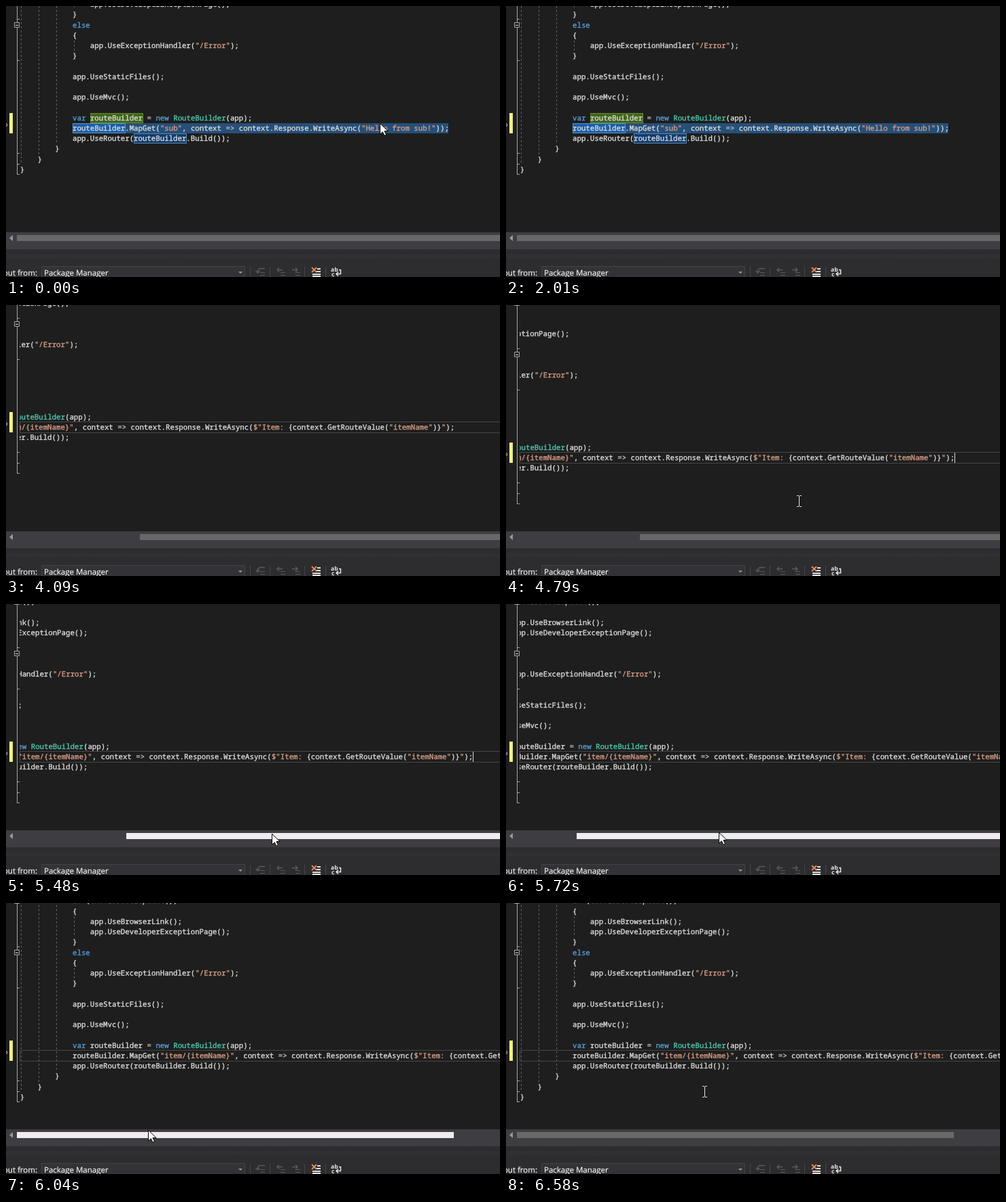
Recreate the animation shown at these times as an HTML page with a canvas. Size 727 px wide and 400 px high, loop 7.42 s.

```html
<!DOCTYPE html>
<html lang="en">
<head>
<meta charset="utf-8">
<title>Code editor</title>
<style>
html, body { margin: 0; width: 100%; height: 100%; overflow: hidden; background: #1e1e1e; }
canvas { display: block; }
</style>
</head>
<body>
<canvas id="stage" width="727" height="400"></canvas>
<script>
const W = 727, H = 400, LOOP = 7420;
const ctx = document.getElementById('stage').getContext('2d');

const CELL = 6.44, ROW = 15.24, SCROLL_ROW = 15, LEFT = 20.8, TOP = 20.4;
const EDITOR_BOTTOM = 334, CARET_ROW = 10;
const CODE_FONT = '10.733px "Noto Sans Mono", "DejaVu Sans Mono", monospace';
const UI_FONT = '11.5px "Open Sans", "Noto Sans", sans-serif';
const COLOR = { k: '#569cd6', s: '#d69d85', t: '#4ec9b0', o: '#b4b4b4', p: '#dcdcdc' };

// Markup: <k:word> colours a token, everything else is plain text.
const CODE = [
  [-5, 8, '<k:if> (env.IsDevelopment())'],
  [-4, 8, '{'],
  [-3, 12, 'app.UseBrowserLink();'],
  [-2, 12, 'app.UseDeveloperExceptionPage();'],
  [-1, 8, '}'],
  [0, 8, '<k:else>'],
  [1, 8, '{'],
  [2, 12, 'app.UseExceptionHandler(<s:"/Error">);'],
  [3, 8, '}'],
  [5, 8, 'app.UseStaticFiles();'],
  [7, 8, 'app.UseMvc();'],
  [9, 8, '<k:var> routeBuilder <o:=> <k:new> <t:RouteBuilder>(app);'],
  [11, 8, 'app.UseRouter(routeBuilder.Build());'],
  [12, 4, '}'],
  [13, 0, '}'],
  [14, -4, '}']
];
const OLD_LINE = 'routeBuilder.MapGet(<s:"sub">, context <o:=\u003e> context.Response.WriteAsync(<s:"Hello from sub!">));';
const NEW_LINE = 'routeBuilder.MapGet(<s:"item/{itemName}">, context <o:=\u003e> context.Response.WriteAsync(' +
  '<s:$"Item: >{context.GetRouteValue(<s:"itemName">)}<s:">);';

// Indent guides: column, first row, last row.
const GUIDES = [[0, -8, 13], [4, -8, 12], [8, -8, 11], [12, -3, -2], [12, 2, 2]];

// Hard changes: [time, value...]
const SCROLL = [[0, 0], [4250, 1], [4400, 2], [4630, 3]];
const CARET = [[0, 0], [370, 1], [910, 0], [1460, 1], [2010, 0], [2160, 1], [2470, 0], [2550, 1],
  [3010, 0], [3560, 1], [4090, 0], [4630, 1]];
const THUMB = [[0, '#686868'], [5020, '#9e9e9e'], [5330, '#efebef'], [6350, '#9e9e9e'], [6430, '#686868']];
const POINTER = [
  [0, 'arrow', 550, 173], [520, 'beam', 553, 170], [600, ''],
  [4170, 'beam', 470, 250], [4250, 'beam', 440, 280], [4320, 'beam', 431, 289],
  [4860, 'beam', 428, 308], [4940, 'arrow', 421, 334], [5020, 'arrow', 414, 342], [5100, 'arrow', 412, 340],
  [6350, 'arrow', 222, 334], [6430, 'beam', 255, 302], [6510, 'beam', 282, 284], [6580, 'beam', 292, 278]
];
const PASTE = 2160, DRAG = 5480, DRAG_STEP = 78, DRAG_LAST = 7;

const at = (list, t) => list.filter(e => e[0] <= t).pop();
const dragStep = t => Math.min(DRAG_LAST, Math.floor((t - DRAG) / DRAG_STEP));

function rect(x, y, w, h, color) {
  ctx.fillStyle = color;
  ctx.fillRect(x, y, w, h);
}

function frame(x, y, w, h, color) {
  ctx.strokeStyle = color;
  ctx.lineWidth = 1;
  ctx.strokeRect(x + 0.5, y + 0.5, w - 1, h - 1);
}

function path(points, color, width = 1) {
  ctx.beginPath();
  points.forEach(([x, y]) => ctx.lineTo(x, y));
  ctx.strokeStyle = color;
  ctx.lineWidth = width;
  ctx.stroke();
}

function fillShape(points, color) {
  ctx.beginPath();
  points.forEach(([x, y]) => ctx.lineTo(x, y));
  ctx.closePath();
  ctx.fillStyle = color;
  ctx.fill();
}

// A hairline outline gives the text its sturdy screen weight.
function write(text, x, y, color, weight) {
  ctx.fillStyle = ctx.strokeStyle = color;
  ctx.lineWidth = weight;
  ctx.fillText(text, x, y);
  ctx.strokeText(text, x, y);
}

function label(text, x, y, align = 'left') {
  ctx.font = UI_FONT;
  ctx.textAlign = align;
  write(text, x, y, '#f1f1f1', 0.2);
  ctx.textAlign = 'left';
}

function codeLine(markup, x, y) {
  ctx.font = CODE_FONT;
  const tokens = markup.matchAll(/<([kst]):([^>]*)>|<o:(=>?)>|([^<]+)/g);
  for (const [, kind, word, op, plain] of tokens) {
    const text = word || op || plain;
    write(text, x, y, COLOR[kind || (op ? 'o' : 'p')], 0.35);
    x += text.length * CELL;
  }
}

function view(t) {
  let shift = 0;
  if (t >= DRAG) shift = Math.max(0, 209.5 - 31.8 * dragStep(t));
  else if (t >= PASTE) shift = 236.5;
  const top = TOP + at(SCROLL, t)[1] * SCROLL_ROW;
  return { shift, x: col => LEFT - shift + col * CELL, y: row => top + row * ROW };
}

function highlight(v, col, row, fill, edge) {
  const x = Math.round(v.x(col)), y = Math.round(v.y(row));
  rect(x, y, 78, 15, fill);
  frame(x, y, 78, 15, edge);
}

function margin(v, t) {
  const gray = '#a5a5a5', end = Math.round(v.y(14) + 15);
  rect(5, Math.round(v.y(9)), 5, 30, '#eff284');
  rect(16, 0, 1, end, gray);
  for (const row of [-1, 3, 12, 13, 14]) rect(16, Math.round(v.y(row) + 14), 4, 1, gray);
  for (const row of [-5, 0]) {
    const y = Math.round(v.y(row) + 3.5);
    rect(12, y, 8, 8, '#1e1e1e');
    frame(12, y, 8, 8, gray);
    rect(14, y + 4, 4, 1, '#dcdcdc');
  }
  if (t < PASTE || t >= 2780) {
    ctx.beginPath();
    ctx.arc(-0.5, v.y(CARET_ROW) + 2.8, 2.2, -1.5, 1.5);
    ctx.strokeStyle = '#c8c8c8';
    ctx.lineWidth = 1;
    ctx.stroke();
  }
}

function editor(v, t) {
  const pasted = t >= PASTE, caretY = Math.round(v.y(CARET_ROW));
  ctx.save();
  ctx.beginPath();
  ctx.rect(0, 0, W, EDITOR_BOTTOM);
  ctx.clip();
  margin(v, t);
  ctx.beginPath();
  ctx.rect(20, 0, W, EDITOR_BOTTOM);
  ctx.clip();

  ctx.setLineDash([3, 3]);
  for (const [col, from, to] of GUIDES) {
    const x = Math.round(v.x(col) + 1.5) + 0.5;
    path([[x, Math.round(v.y(from))], [x, Math.round(v.y(to + 1))]], '#626262');
  }
  ctx.setLineDash([]);

  if (!pasted) {
    rect(98, caretY, 553, 15, '#264f78');
    highlight(v, 16, 9, '#41651a', '#628a30');
    highlight(v, 12, CARET_ROW, '#1a5fa8', '#5c93c8');
    highlight(v, 26, 11, '#113d6f', '#5c86ad');
  } else if (t >= 2240) {
    frame(20, caretY - 1, W, 17, '#464646');
  }

  for (const [row, indent, text] of CODE) {
    codeLine(text, v.x(indent + 4), Math.round(v.y(row) + 11.2));
  }
  codeLine(pasted ? NEW_LINE : OLD_LINE, v.x(12), Math.round(v.y(CARET_ROW) + 11.2));

  if (at(CARET, t)[1]) {
    const x = pasted ? Math.round(v.x(136)) : 98;
    rect(x, caretY, 1, 15, '#dcdcdc');
  }
  ctx.restore();
}

function scrollbar(v, t) {
  rect(0, EDITOR_BOTTOM, W, 25, '#3e3e42');
  fillShape([[5, 342.5], [10, 338], [10, 347]], '#999999');
  const settled = t >= 2240;
  const x = settled ? Math.round(16 + v.shift * 0.767) : 16;
  rect(x, 338, settled ? 643 : W, 9, at(THUMB, t)[1]);
}

function indentIcon(x, dir) {
  const dim = '#5a5a5e', mid = x + 4;
  path([[mid - 4 * dir, 389.5], [mid + 4 * dir, 389.5]], dim, 1.5);
  path([[mid - dir, 386.5], [mid - 4 * dir, 389.5], [mid - dir, 392.5]], dim, 1.5);
  for (const y of [393, 397]) rect(x + 5, y, 7, 1, dim);
}

function toolbar() {
  rect(0, 359, W, 41, '#2d2d30');
  for (let x = 0; x < W; x += 4) {
    rect(x, 367, 1, 1, '#46464a');
    rect(x + 2, 369, 1, 1, '#46464a');
    rect(x, 371, 1, 1, '#46464a');
  }

  label('Show output from:', 46, 398, 'right');
  rect(52, 384, 300, 20, '#333337');
  frame(52, 384, 300, 20, '#434346');
  label('Package Manager', 56, 398);
  fillShape([[342, 392], [348, 392], [345, 395]], '#999999');

  for (const x of [359, 388, 439, 470]) rect(x, 385, 1, 15, '#46464a');

  const dim = '#5a5a5e';
  path([[381, 387.5], [373, 387.5], [370.5, 390], [370.5, 393]], dim, 1.5);
  path([[367.5, 391], [370.5, 394], [373.5, 391]], dim, 1.5);
  for (const y of [393, 397]) rect(374, y, 7, 1, dim);
  indentIcon(399, 1);
  indentIcon(421, -1);

  for (const [y, x] of [[387, 458], [391, 457], [395, 451], [398, 451]]) rect(x, y, 463 - x, 2, '#e0e0e0');
  path([[450, 386], [457, 393]], '#e08a5c', 2);
  path([[457, 386], [450, 393]], '#e08a5c', 2);

  const light = '#e8e8e8';
  ctx.font = 'bold 8.5px "Open Sans", "Noto Sans", sans-serif';
  ctx.fillStyle = light;
  ctx.fillText('ab', 478, 392);
  ctx.fillText('c', 479, 399);
  path([[490, 389.5], [492.5, 389.5], [492.5, 395.5], [486, 395.5]], light, 1.5);
  path([[489, 392.5], [486, 395.5], [489, 398.5]], light, 1.5);
}

function arrow(x, y) {
  const points = [[0, 0], [0, 16], [3.8, 12.4], [6.4, 18], [9, 16.8], [6.5, 11.3], [11.6, 11.3]]
    .map(([dx, dy]) => [x + 0.5 + dx, y + 0.3 + dy]);
  fillShape(points, '#ffffff');
  path([...points, points[0]], '#000000');
}

function beam(x, y) {
  const light = '#e6e6e6';
  rect(x, y - 7, 1, 15, light);
  for (const end of [y - 8, y + 8]) {
    rect(x - 3, end, 3, 1, light);
    rect(x + 1, end, 3, 1, light);
  }
}

function pointer(t) {
  if (t >= DRAG && t < 6350) {
    const k = dragStep(t);
    arrow(391 - 26 * k, Math.round(339 - 0.6 * k));
    return;
  }
  const [, kind, x, y] = at(POINTER, t);
  if (kind === 'arrow') arrow(x, y);
  if (kind === 'beam') beam(x, y);
}

function draw(t) {
  const v = view(t);
  rect(0, 0, W, H, '#1e1e1e');
  editor(v, t);
  scrollbar(v, t);
  toolbar();
  pointer(t);
}

ctx.textRendering = 'geometricPrecision';
ctx.lineJoin = 'round';
const start = performance.now();
function tick() {
  draw((performance.now() - start) % LOOP);
  requestAnimationFrame(tick);
}
tick();
</script>
</body>
</html>
```
